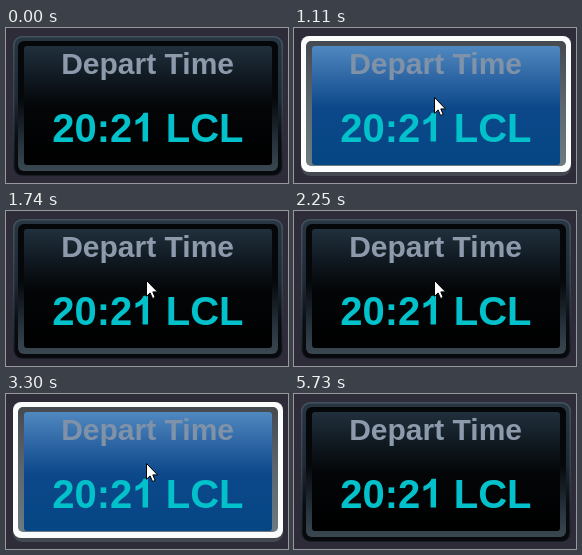
These frames come from a looping animation (282 by 155 pixels, 6120 ms). An HTML page:

```html
<!DOCTYPE html>
<html lang="en">
<head>
<meta charset="utf-8">
<title>Depart Time</title>
<style>
  html, body { margin: 0; width: 100%; height: 100%; overflow: hidden; background: #2e2c39; }
  svg { display: block; width: 100vw; height: 100vh; }
  text { font-family: "Liberation Sans", Arial, sans-serif; font-weight: bold; }
</style>
</head>
<body>
<svg viewBox="0 0 282 155">
  <defs>
    <linearGradient id="rim" x2="0" y2="1">
      <stop offset="0" stop-color="#42525f"/>
      <stop offset=".5" stop-color="#35424f"/>
      <stop offset="1" stop-color="#1a2028"/>
    </linearGradient>
    <linearGradient id="steel" x2="0" y2="1">
      <stop offset="0" stop-color="#283642"/>
      <stop offset=".45" stop-color="#1e2934"/>
      <stop offset=".75" stop-color="#090c10"/>
      <stop offset="1" stop-color="#07090c"/>
    </linearGradient>
    <linearGradient id="lip" x2="0" y2="1">
      <stop offset="0" stop-color="#040608"/>
      <stop offset=".45" stop-color="#06090c"/>
      <stop offset=".8" stop-color="#28343e"/>
      <stop offset="1" stop-color="#3a4852"/>
    </linearGradient>
    <linearGradient id="gloss" x2="0" y2="1">
      <stop offset="0" stop-color="#21303d"/>
      <stop offset=".25" stop-color="#111a22"/>
      <stop offset=".52" stop-color="#030507"/>
      <stop offset="1" stop-color="#000"/>
    </linearGradient>
    <linearGradient id="bevel" x2="0" y2="1">
      <stop offset="0" stop-color="#454950"/>
      <stop offset=".5" stop-color="#5c666e"/>
      <stop offset="1" stop-color="#6d7a82"/>
    </linearGradient>
    <linearGradient id="blue" x2="0" y2="1">
      <stop offset="0" stop-color="#5088c0"/>
      <stop offset=".25" stop-color="#3068a6"/>
      <stop offset=".52" stop-color="#0c488a"/>
      <stop offset="1" stop-color="#054684"/>
    </linearGradient>
  </defs>

  <g id="idle">
    <rect x="7" y="8" width="270" height="140" rx="9" fill="url(#rim)"/>
    <rect x="8.5" y="9.5" width="267" height="137.5" rx="8" fill="url(#steel)"/>
    <rect x="12" y="13" width="260" height="130" rx="6" fill="url(#lip)"/>
    <rect x="18" y="18" width="248" height="119" rx="3" fill="url(#gloss)"/>
  </g>

  <g id="lit">
    <rect x="7" y="8" width="270" height="140" rx="9" fill="#444850"/>
    <rect x="7" y="8" width="270" height="136" rx="8" fill="#fbfcfc"/>
    <rect x="12" y="13" width="260" height="125" rx="5" fill="url(#bevel)"/>
    <rect x="18" y="18" width="248" height="119" rx="3" fill="url(#blue)"/>
  </g>

  <text id="label" x="55.2" y="45.7" font-size="30">Depart Time</text>
  <g fill="#02c1ca">
    <!-- The last digit is drawn without a foot. -->
    <text x="46.3" y="113.6" font-size="40">20:2<tspan fill="none">1</tspan> LCL</text>
    <path transform="translate(126.3 113.6) scale(.01953 -.01953)"
          d="M806 0H525V1059Q371 915 162 846V1101Q272 1137 401 1237T578 1472H806Z"/>
  </g>

  <path id="cursor" d="M.5 .5V16.3L4.1 12.9L6.6 18.5L9.2 17.4L6.8 11.9H11.6Z"
        fill="#fff" stroke="#000" stroke-width="1"/>
</svg>
<script>
  const LOOP = 6120, STEP = 30;
  const toggles = [1110, 1260, 1560, 1740, 2100, 2250, 2760, 2910, 3300, 5070];
  const rest = { x: 140, y: 69 };
  const [idle, lit, label, cursor] =
    ["idle", "lit", "label", "cursor"].map(id => document.getElementById(id));

  const show = (el, on) => el.setAttribute("visibility", on ? "visible" : "hidden");
  const mix = (a, b, p) => Math.round(a + (b - a) * p);
  const between = (a, b, p) => ({ x: mix(a.x, b.x, p), y: mix(a.y, b.y, p) });

  function cursorAt(t) {
    if (t < 360 || t >= 5730) return null;
    if (t < 600) {
      const p = Math.floor((t - 360) / STEP) / 8;
      return between({ x: 275, y: 34 }, rest, 1 - (1 - p) ** 1.6);
    }
    if (t < 5400) return rest;
    const p = (Math.floor((t - 5400) / STEP) + 1) / 12;
    return between(rest, { x: 283, y: 40 }, p ** 1.6);
  }

  function draw(t) {
    const pressed = toggles.filter(time => t >= time).length % 2 === 1;
    show(idle, !pressed);
    show(lit, pressed);
    label.setAttribute("fill", pressed ? "#8092a8" : "#8c9aab");
    const pos = cursorAt(t);
    show(cursor, pos);
    if (pos) cursor.setAttribute("transform", `translate(${pos.x} ${pos.y})`);
  }

  const start = performance.now();
  function tick() {
    draw((performance.now() - start) % LOOP);
    requestAnimationFrame(tick);
  }
  draw(0);
  requestAnimationFrame(tick);
</script>
</body>
</html>
```
